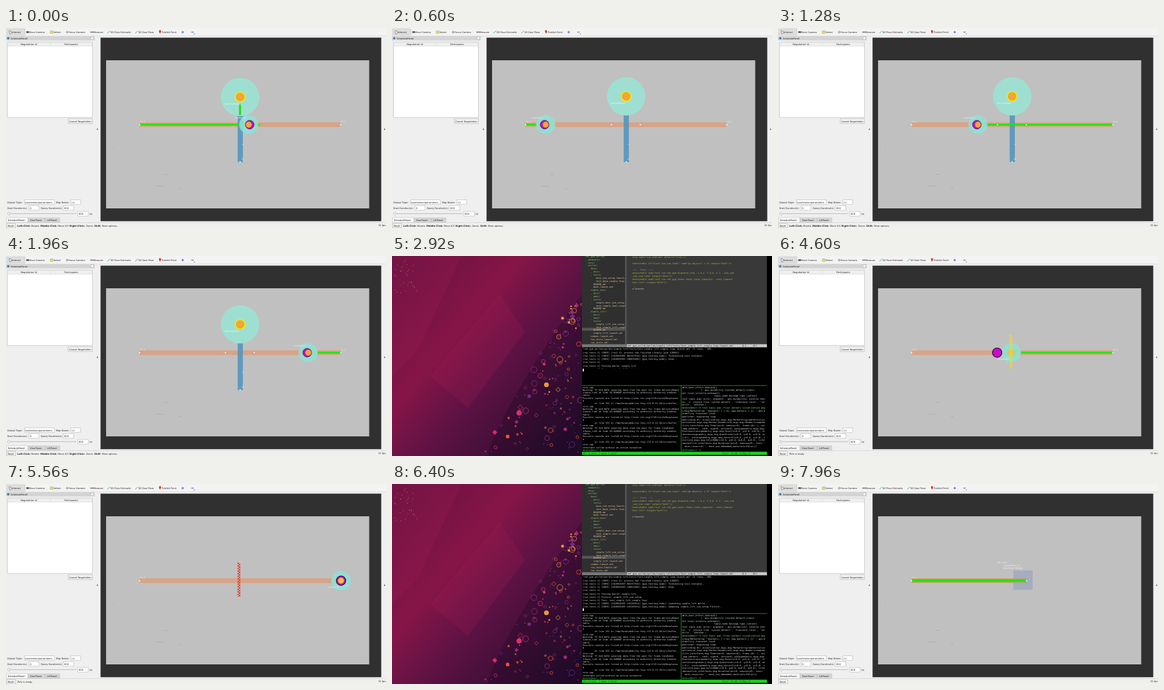
An HTML page that plays this animation: 600x316 px, repeating every 8 s.

```html
<!DOCTYPE html>
<html lang="en">
<head>
<meta charset="utf-8">
<title>Robot lane viewer</title>
<style>
html, body { margin: 0; width: 100%; height: 100%; overflow: hidden; background: #efefef; }
svg { display: block; width: 100vw; height: 100vh; }
text { font: 3.65px "DejaVu Sans", sans-serif; fill: #222; text-rendering: geometricPrecision; white-space: pre; }
.b { font-weight: bold; }
.tag { fill: #f4f4f4; font-size: 3.3px; }
.box { fill: #fff; stroke: #b4b4b4; stroke-width: .6; }
.btn { fill: #f4f4f4; stroke: #aaa; stroke-width: .6; }
.lane { fill: #d8a487; }
.go { fill: #22e412; }
.dot { fill: #fff; }
.mono text { font: 3.52px "DejaVu Sans Mono", monospace; fill: #ddd; }

/* one shared 8 s clock: 1% is 80 ms */
.step { animation: 8s step-end infinite; }
.move { animation: 8s linear infinite; }
.span { transform-box: fill-box; transform-origin: left; }
.span.right { transform-origin: right; }

#desk { animation-name: desk; }
#map { animation-name: map; }
#cross { animation-name: cross; }
#door { animation-name: door; }
#lift { animation-name: lift; }
#tip { animation-name: cross; }
#ready { animation-name: ready; }
#fps { animation-name: fps; }
#idle { animation-name: idle; }
@keyframes desk { 0% { opacity: 0 } 33.5% { opacity: 1 } 39.5% { opacity: 0 } 75% { opacity: 1 } 80.5% { opacity: 0 } }
@keyframes map { 0% { opacity: 1 } 33.5% { opacity: 0 } 43.2% { opacity: 1 } 75% { opacity: 0 } 84% { opacity: 1 } }
@keyframes cross { 0% { opacity: 1 } 33.5%, 100% { opacity: 0 } }
@keyframes door { 0% { opacity: 0 } 46.5% { opacity: 1 } 75%, 100% { opacity: 0 } }
@keyframes lift { 0% { opacity: 0 } 87% { opacity: 1 } }
@keyframes ready { 0% { opacity: 0 } 33.5% { opacity: 1 } 87%, 100% { opacity: 0 } }
@keyframes fps { 0% { opacity: 1 } 33.5% { opacity: 0 } 46.5% { opacity: 1 } 75% { opacity: 0 } 84.5% { opacity: 1 } }
@keyframes idle { 0% { opacity: 0 } 33.5% { opacity: 1 } 46.5% { opacity: 0 } 75% { opacity: 1 } 84.5%, 100% { opacity: 0 } }

#tiny { animation-name: tiny; }
#tinyBody { animation-name: sway; }
#goLeft { animation-name: goLeft; }
#goRight { animation-name: goRight; }
#big { animation-name: big; }
#goUp { animation-name: goUp; }
#stub { animation-name: stub; }
#wait { animation-name: stub2; }
@keyframes tiny {
  0% { transform: translateX(383.5px) } 9.2%, 10.5% { transform: translateX(211px) }
  24.5% { transform: translateX(477px) } 27.25%, 100% { transform: translateX(529px) }
}
@keyframes sway {
  0% { transform: translateX(1.5px) } 7.5%, 24.5% { transform: translateX(-1.7px) } 28%, 100% { transform: none }
}
@keyframes goLeft { 0% { transform: scaleX(.494) } 8.4%, 100% { transform: scaleX(0) } }
@keyframes goRight {
  0%, 10.49% { transform: scaleX(0) } 10.5% { transform: scaleX(.953) } 26.5%, 100% { transform: scaleX(0) }
}
@keyframes big { 0% { transform: translateY(1px) } 4%, 100% { transform: none } }
@keyframes goUp { 0% { transform: scaleY(1) } 4%, 100% { transform: scaleY(0) } }
@keyframes stub { 0% { opacity: 1 } 1.5%, 100% { opacity: 0 } }
@keyframes stub2 { 0% { opacity: 0 } 1.5%, 100% { opacity: 1 } }

#plan { animation-name: plan; }
#body { animation-name: body; }
#goDoor { animation-name: goDoor; }
#panel { animation-name: panel; }
#late { animation-name: late; }
@keyframes plan {
  0%, 49.1% { transform: translateX(211px) } 56.3% { transform: translateX(346px) }
  57.5% { transform: translateX(368px) } 66% { transform: translateX(528px) } 69.5%, 100% { transform: translateX(529px) }
}
@keyframes body {
  0%, 49.1% { transform: translateX(211px) } 56.3%, 57.6% { transform: translateX(346px) }
  59% { transform: translateX(396px) } 66% { transform: translateX(527px) } 69.5%, 100% { transform: translateX(529px) }
}
@keyframes goDoor {
  0%, 49.1% { transform: scaleX(.953) } 56.3% { transform: scaleX(.528) } 57.5% { transform: scaleX(.459) }
  65.3%, 100% { transform: scaleX(0) }
}
@keyframes panel {
  0% { stroke: #e33b26 } 55% { stroke: #f5d821 } 58.2% { stroke: #35d52b } 63.5% { stroke: #f5d821 } 66%, 100% { stroke: #e33b26 }
}
@keyframes late { 0% { opacity: 0 } 72.5%, 100% { opacity: 1 } }

#cabin { animation-name: cabin; }
#liftGo { animation-name: liftGo; }
#liftTag { animation-name: liftTag; }
@keyframes cabin { 0% { opacity: 0 } 88.5%, 100% { opacity: 1 } }
@keyframes liftGo { 0% { opacity: 0 } 90.5%, 100% { opacity: 1 } }
@keyframes liftTag { 0% { opacity: 0 } 94.5%, 100% { opacity: 1 } }

#cover { animation-name: cover; }
@keyframes cover {
  0%, 33.5% { transform: none; animation-timing-function: steps(10) } 39.4%, 74.9% { transform: translateY(55px) }
  75% { transform: none; animation-timing-function: steps(10) } 79.5%, 100% { transform: translateY(55px) }
}
</style>
</head>
<body>
<svg viewBox="0 0 600 316" preserveAspectRatio="none">
<defs>
  <linearGradient id="wall" x1="0" y1="0" x2="1" y2=".9">
    <stop offset="0" stop-color="#641141"/><stop offset=".38" stop-color="#861547"/>
    <stop offset=".6" stop-color="#5c1244"/><stop offset="1" stop-color="#210c2b"/>
  </linearGradient>
  <clipPath id="treeClip"><path d="M300 0h68v139h-68z"/></clipPath>
</defs>

<!-- window -->
<path fill="#efefef" d="M0 0h600v316H0z"/>
<path fill="#f3f3f3" d="M0 0h600v12.5H0z"/>
<path stroke="#d0d0d0" stroke-width=".6" d="M0 12.7h600"/>
<path fill="#dedede" stroke="#bbb" stroke-width=".5" d="M1 1.2h29v10H1z"/>
<path fill="#fff" stroke="#555" stroke-width=".6" d="M5 4l3 1v4H5.500z"/>
<path fill="#666" d="M32 5h4v3h-4z"/>
<path fill="#f4e04d" stroke="#999" stroke-width=".6" d="M70 4.500h4v4h-4z"/>
<path stroke="#777" stroke-width=".7" d="M94 6.500h5M96.500 4v5"/>
<path stroke="#777" stroke-width="1.600" d="M133 6.500h5"/>
<path stroke="#3db54a" stroke-width=".9" fill="none" d="M160 8.500l4.500-4M204 8.500l4.500-4"/>
<path fill="#cf3b20" d="M241.500 5a1.700 1.700 0 0 1 3.400 0q0 1.500-1.700 4-1.700-2.500-1.700-4"/>
<path stroke="#3d6fc0" stroke-width="1" d="M277 6.500h4M279 4.500v4M292.500 6.500h4"/>
<path fill="#444" d="M296.500 9h2l-1 1.200z"/>
<g id="tools"></g>

<!-- side panel -->
<path fill="#d4d4d4" d="M0 13h140v6.500H0z"/>
<circle cx="3.500" cy="16.200" r="1.900" fill="#4a7fae"/>
<text x="7.500" y="17.700">SchedulePanel</text>
<path class="btn" d="M134 13.800h4.500v4.500H134z"/>
<path class="box" d="M2.300 22.300h134.200v119H2.300z"/>
<path fill="#efefef" stroke="#ccc" stroke-width=".5" d="M2.600 22.600h133.600v6H2.600zM70 22.600v6"/>
<text x="36" y="27" text-anchor="middle">Negotiation Id</text>
<text x="103" y="27" text-anchor="middle">Participants</text>
<path class="btn" d="M98.300 143.300h38v7.600h-38z"/>
<text x="117.300" y="148.500" text-anchor="middle">Cancel Negotiation</text>
<path class="box" d="M29.300 271.500h47v7.200h-47zM102.300 271.500h15.500v7.200h-15.500zM36.300 280.700H52v7.200H36.300zM90.300 280.700H107v7.200H90.300zM113.300 290H130v7.200h-16.700z"/>
<g id="form"></g>
<path stroke="#bbb" stroke-width="1" d="M2 293.300h109"/>
<circle class="btn" cx="4.500" cy="293.300" r="2"/>
<path fill="#d6d6d6" stroke="#b5b5b5" stroke-width=".5" d="M35 300h26.500v7H35zM62 300h23v7H62z"/>
<path fill="#f7f7f7" stroke="#b5b5b5" stroke-width=".5" d="M.5 299.300h34v8H.5z"/>
<path stroke="#c8c8c8" stroke-width=".5" d="M0 307.500h600"/>
<text x="3" y="304.700">SchedulePanel</text><text x="38" y="304.700">DoorPanel</text><text x="65" y="304.700">LiftPanel</text>
<path class="btn" d="M.6 309h14.600v6.600H.6z"/>
<text x="2.500" y="313.900">Reset</text>
<path fill="#555" d="M145 158.500v3l-2-1.500zM597 158.500v3l2-1.500z"/>
<g id="tip" class="step"><text x="18" y="313.900"><tspan class="b">Left-Click:</tspan> Rotate. <tspan class="b">Middle-Click:</tspan> Move X/Y. <tspan class="b">Right-Click:</tspan>: Zoom. <tspan class="b">Shift</tspan>: More options.</text></g>
<g id="ready" class="step"><text x="18" y="313.900">RViz is ready.</text></g>
<text id="fps" class="step" x="588" y="313.400">31 fps</text>
<text id="idle" class="step" x="590.500" y="313.400">0 fps</text>

<!-- 3D view -->
<path fill="#303030" d="M149.300 15.200H592.500V305.300H149.300z"/>
<g id="map" class="step">
  <path fill="#c0c0c0" d="M158 51h415.500v234H158z"/>
  <path stroke="#aaa" stroke-width=".8" d="M249 231.500h6M236 249.500h6M242 250.200h7M273 253.800h4M168 190h2"/>
</g>

<!-- crossing lanes -->
<g id="cross" class="step">
  <path class="lane" d="M211 149h317v7.400H211z"/>
  <path fill="#4f93be" opacity=".85" d="M365.800 117h8.200v95h-8.200z"/>
  <rect id="goLeft" class="go move span" x="211" y="151.200" width="318" height="3"/>
  <rect id="goRight" class="go move span right" x="211" y="151.300" width="318" height="3"/>
  <g id="stub" class="step"><path class="go" d="M398 151.300l5 1.500-5 1.500z"/></g>
  <g id="wait" class="step">
    <circle class="dot" cx="346.500" cy="152.700" r="1"/><circle class="dot" cx="392" cy="152.700" r="1"/>
  </g>
  <circle class="dot" cx="211" cy="152.700" r="1"/><circle class="dot" cx="528.500" cy="152.700" r="1"/>
  <circle class="dot" cx="369.700" cy="211.500" r="1"/><circle class="dot" cx="373.700" cy="184" r=".6"/>
  <text class="tag" x="212" y="149">L1_1</text><text class="tag" x="529" y="149">L1_2</text><text class="tag" x="372" y="208">L1</text>
  <g id="big" class="move">
    <circle cx="369.700" cy="108" r="30.300" fill="#9fdfd2"/>
    <circle cx="369.700" cy="108" r="8.600" fill="#f4e80e"/>
    <circle cx="369.700" cy="108" r="6.300" fill="#f2a53c" stroke="#d99b20" stroke-width=".6"/>
    <text class="tag" x="345.500" y="119.800">deliveryRobot</text>
  </g>
  <g id="goUp" class="move span"><path class="go" d="M367.800 123l1.700-4 1.700 4v14.500h-3.400z"/></g>
  <g id="tiny" class="move">
    <circle cy="152.700" r="15" fill="#8fe0d2" opacity=".88"/>
    <circle id="tinyBody" class="move" cy="152.700" r="6.800" fill="#c80ccb" stroke="#3a1450" stroke-width=".9"/>
    <circle cy="152.700" r="4.700" fill="#f2a53c"/>
    <text class="tag" x="-22" y="142.500">tinyRobot1</text>
  </g>
</g>

<!-- door -->
<g id="door" class="step">
  <path class="lane" d="M211 149h317v7.400H211z"/>
  <rect id="goDoor" class="go move span right" x="211" y="151.300" width="318" height="3"/>
  <circle class="dot" cx="211" cy="152.700" r="1"/><circle class="dot" cx="528.500" cy="152.700" r="1"/>
  <circle id="late" class="dot step" cx="392" cy="152.300" r="1.200"/>
  <text class="tag" x="212" y="149">L1_1</text><text class="tag" x="529" y="149">L1_2</text>
  <g id="plan" class="move">
    <circle cy="152.700" r="15.300" fill="#8fe0d2" opacity=".88"/>
    <text class="tag" x="-21" y="163.700">tinyRobot1</text>
  </g>
  <circle id="body" class="move" cy="152.700" r="7.400" fill="#c80ccb" stroke="#241030" stroke-width="1.100"/>
  <g class="move" style="animation-name:plan"><circle cy="152.700" r="4.700" fill="#f0c233"/></g>
  <path id="panel" class="step" d="M366.700 124v54M369 126v52" fill="none" stroke-width="2" stroke-dasharray="2.600 1.500"/>
</g>

<!-- lift -->
<g id="lift" class="step">
  <path class="lane" d="M211 149h181v7.400H211z"/>
  <g id="cabin" class="step"><path fill="#9aa5bd" opacity=".72" d="M371.700 136.700h30.300V167h-30.300z"/></g>
  <g id="liftGo" class="step">
    <path fill="#b9a24e" d="M211 149.600h181v6H211z"/><path class="go" d="M211 150.700h181v3.800H211z"/>
    <path stroke="#c98838" stroke-width="1" stroke-dasharray="2 1.200" d="M376 151h11"/>
  </g>
  <circle class="dot" cx="211" cy="152.700" r="1"/><circle class="dot" cx="392.500" cy="152.700" r="1"/>
  <text class="tag" x="212" y="149">L1_1</text>
  <g id="liftTag" class="step">
    <text class="tag" x="346.500" y="125.300">Lift: Lift1</text><text class="tag" x="355.500" y="129.800">CurrentFloor: L1</text>
    <text class="tag" x="355.500" y="134.300">DoorState: Moving</text>
  </g>
</g>

<!-- desktop with terminal -->
<g id="desk" class="step mono">
  <path fill="url(#wall)" d="M0 0h300v316H0z"/>
  <path fill="#a51f55" opacity=".22" d="M0 0h110L40 150 0 190zM60 190L170 60l40 60-90 120z"/>
  <path fill="#1b0924" opacity=".3" d="M300 60v256H150q30-90 150-256z"/>
  <g id="motes"></g>
  <path d="M300 0h300v316H300z"/>
  <path fill="#2f2f2f" d="M300 0h68v139h-68z"/><path fill="#393939" d="M368 0h224v139H368z"/>
  <path fill="#555" d="M368 0h2.500v139H368z"/>
  <path fill="#555" d="M300 113.500h68v4.500h-68z"/>
  <g id="tree" clip-path="url(#treeClip)"></g>
  <g id="editor"></g>
  <path fill="#777" d="M300 139.300h71v5h-71z"/><path fill="#c8c8c8" d="M371 139.300h221v5H371z"/>
  <g id="bar"></g>
  <g id="log"></g>
  <g id="cover" class="move"><path d="M300 150h292v55H300z"/><path fill="#eee" d="M301 150.800h2v4h-2z"/></g>
  <path d="M300 204.500h300V316H300z"/>
  <path stroke="#25c425" stroke-width=".7" d="M300 204.700h292M456.500 204.700V309"/>
  <g id="warn"></g><g id="topic"></g>
  <path fill="#1fd01f" d="M300 309.300h292v5H300z"/>
  <g id="tmux"></g>
</g>
</svg>
<script>
const NS = "http://www.w3.org/2000/svg";
const $ = id => document.getElementById(id);

function add(parent, tag, attrs, content = "") {
  const el = document.createElementNS(NS, tag);
  for (const key in attrs) el.setAttribute(key, attrs[key]);
  el.textContent = content;
  parent.append(el);
}
function write(id, x, y, str, color) {
  add($(id), "text", { x, y, ...(color && { style: "fill:" + color }) }, str);
}
function lines(id, x, y, pitch, str, color) {
  str.split("\n").forEach((s, i) => write(id, x, y + i * pitch, s, typeof color === "function" ? color(s) : color));
}

const tools = { "Interact": 9, "Move Camera": 36, "Select": 75, "Focus Camera": 99, "Measure": 138,
  "2D Pose Estimate": 165, "2D Goal Pose": 209, "Publish Point": 246 };
for (const name in tools) write("tools", tools[name], 7.9, name);

[[2, 276.5, "Output Topic:"], [30, 276.5, "isualization/parameters"], [79, 276.5, "Map Name:"], [104, 276.5, "L1"],
 [2, 285.7, "Start Duration(s):"], [38, 285.7, "0"], [55, 285.7, "Query Duration(s):"], [92, 285.7, "600"],
 [115, 295, "600"], [131.5, 295, "(s)"]].forEach(f => write("form", ...f));

// wallpaper shapes, denser towards the lower right
let seed = 11;
const rnd = () => (seed = seed * 16807 % 2147483647) / 2147483647;
const hues = ["#e8562c", "#d52f6a", "#9c2a78", "#e99a3a", "#6d2c86"];
for (let i = 0; i < 150; i++) {
  const y = 75 + 241 * rnd(), x = 299 - rnd() * (y - 45) * .6, r = .5 + 4.2 * rnd() ** 2.2;
  const c = hues[Math.floor(rnd() * 5)];
  const look = rnd() < .35 ? { fill: c } : { fill: "none", stroke: c, "stroke-width": .8 };
  if (i % 3) add($("motes"), "circle", { cx: x, cy: y, r, ...look });
  else add($("motes"), "path", { d: `M${x - r} ${y}l${r} ${-r} ${r} ${r} ${-r} ${r}z`, ...look });
}
for (let i = 0; i < 30; i++)
  add($("motes"), "circle", { cx: 3 + 38 * rnd(), cy: 4 + 58 * rnd(), r: .5, fill: "#d9a03a" });

lines("tree", 301, 1.8, 4.86, `  rmf_gym_worlds/
  _ adapters/
  _ docs/
  _ worlds/
    _ base/
      _ docs/
      _ tests/
          base_sim_setup.launch.xml
          test_base_simple_loop.launch
        README.md
        base.launch.xml
    _ simple_door/
      _ docs/
      _ maps/
      _ tests/
          simple_door_sim_setup.launch
          test_simple_door_simple_loop
        README.md
    _ simple_lift/
      _ docs/
      _ maps/
      _ tests/
          simple_lift_sim_setup.launch
          test_simple_lift_simple_loop
        README.md
        simple_lift.launch.xml
      common.launch.xml
      run_tests.launch.xml
      run_tests.xml`, s => s.endsWith("/") ? "#8fbf7a" : "#e6c9a0");

lines("editor", 379, 2.6, 5, `<arg name="use_simtime" default="true"/>

<executable if="$(var use_sim_time)" cmd="gz physics -s 0" output="both"/>

 <!-- Tests -->
<executable cmd="ros2 run rmf_gym dispatch_loop -s b_a -f b_b -n 1 --use_sim
_use_sim_time" output="both"/>
<executable cmd="ros2 run rmf_gym_tasks check_tasks_complete --task_timeout
test.lift" output="both"/>

</launch>`, s => s.includes("!--") ? "#999" : s[0] === "<" && s.length < 20 ? "#c9d4dd" : "#b5b83f");

write("bar", 371.5, 143, "rmf_gym_worlds/worlds/simple_lift/tests/test_simple_lift_simple_loop.launch.xml", "#111");
write("bar", 553, 143, "9,1     All", "#111");
write("bar", 301, 148.3, '"rmf_gym_worlds/worlds/simple_lift/tests/test_simple_lift_simple_loop.launch.xml" 15 lines --60%--');

const run = "[run_tests-1] ", info = run + "[INFO] [1620925697.";
lines("log", 301, 154.3, 5.05, [
  run + "[INFO] [ros2-3]: process has finished cleanly [pid 128955]",
  info + "983337634] [gym_testing_node]: Terminating test instance..",
  info + "140815803] [gym_testing_node]: Done.",
  run, run + "Testing World: simple_lift", run + "Fixture: simple_lift_sim_setup",
  run + "Test: test_simple_lift_simple_loop",
  info + "141245614] [gym_testing_node]: Launching simple_lift World..",
  info + "145245614] [gym_testing_node]: Spawning simple_lift_sim_setup Fixture.."].join("\n"));
add($("log"), "path", { d: "M301 196.500h2v4h-2z", fill: "#eee" });

const warning = (name, at) => `core.cpp
Warning: TF_OLD_DATA ignoring data from the past for frame ${name}
1/base_link at time ${at} according to authority Authority undetec
table
Possible reasons are listed at http://wiki.ros.org/tf/Errors%20explaine
d
         at line 332 in /tmp/binarydeb/ros-foxy-tf2-0.13.10/src/buffer_
`;
lines("warn", 301, 208.500, 4.33, warning("deliveryRobot", "10.030000") + warning("deliveryRobot", "10.049000") +
  warning("tinyRobot", "10.049000") + "core.cpp\nterminate called without an active exception");
write("warn", 301, 308, "devbox@host:~$", "#5fd65f");

lines("topic", 458, 208.500, 4.65, `able,best_effort,unknown}]
              [--qos-durability {system_default,transi
ent_local,volatile,unknown}]
                        topic_name message_type [values]
ros2 topic pub: error: argument --qos-durability: invalid choi
ce: 'x' (choose from 'system_default', 'transient_local', 'vol
atile', 'unknown')
devbox@host:~$ ros2 topic pub /floor_markers visualization_msg
s/msg/MarkerArray "{markers: [ { ns: map_markers } ]}" --qos-d
urability transient_local
publisher: beginning loop
publishing #1: visualization_msgs.msg.MarkerArray(markers=[vis
ualization_msgs.msg.Marker(header=std_msgs.msg.Header(stamp=bu
iltin_interfaces.msg.Time(sec=0, nanosec=0), frame_id=''), ns=
'map_markers', id=0, type=0, action=0, pose=geometry_msgs.msg.
Pose(position=geometry_msgs.msg.Point(x=0.0, y=0.0, z=0.0), or
ientation=geometry_msgs.msg.Quaternion(x=0.0, y=0.0, z=0.0, w=
1.0)), scale=geometry_msgs.msg.Vector3(x=0.0, y=0.0, z=0.0), c
olor=std_msgs.msg.ColorRGBA(r=0.0, g=0.0, b=0.0, a=0.0), lifet
ime=builtin_interfaces.msg.Duration(sec=0, nanosec=0), text=''
, mesh_resource='', mesh_use_embedded_materials=False)])`, s => s.startsWith("devbox") ? "#9fe09f" : "");
write("topic", 458, 308, "devbox@host:~$", "#5fd65f");
write("tmux", 301, 313, "[0] 0:ros2- 1:bash 2:bash*", "#0a5a0a");
write("tmux", 520, 313, '"host" 01:08 14-May-21', "#0a5a0a");
</script>
</body>
</html>
```
